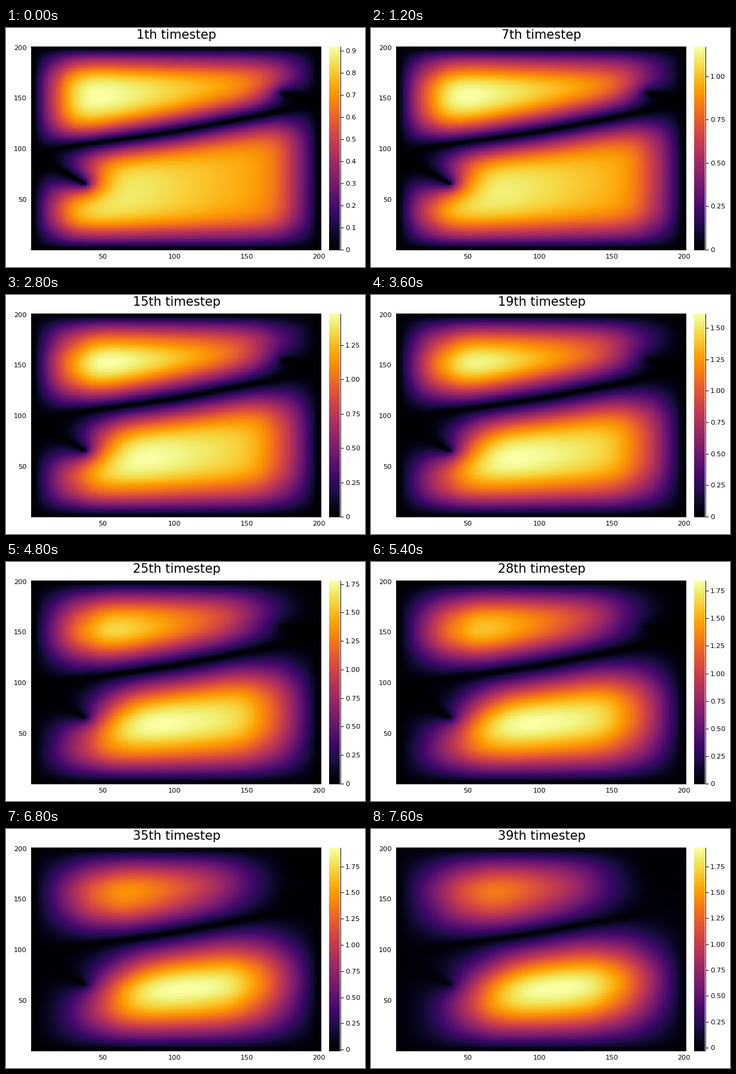
A matplotlib script that plays this animation: 600 px wide and 400 px high, repeating every 7.8 s.

```python
import numpy as np
import matplotlib.pyplot as plt
from matplotlib.animation import FuncAnimation

W, H, N, STEPS = 600, 400, 201, 39
L, R, TOP, BOT = 42, 527, 31, 372
BAR_L, BAR_R = 540, 558
WALL = [(38, 66), (1, 95), (22, 102), (66, 110.5), (100, 117.5),
        (130, 125.5), (165, 135), (201, 148), (173.5, 156.5)]
SPEED, SUB, LEAD = 0.92, 4, 18   # cells per step, substeps, steps before start
SOFTEN = 100                     # variance/2 of the initial smoothing

plt.rcParams["font.family"] = "DejaVu Sans"


def free_cells(margin):
    free = np.zeros((N, N))
    free[margin:-margin, margin:-margin] = 1
    for (x0, y0), (x1, y1) in zip(WALL, WALL[1:]):
        k = np.linspace(0, 1, 500)
        col = np.rint(x0 + (x1 - x0) * k).astype(int) - 1
        row = np.rint(y0 + (y1 - y0) * k).astype(int) - 1
        free[row, col] = 0
    return free


def laplace(u):
    out = np.zeros_like(u)
    out[1:-1, 1:-1] = (u[:-2, 1:-1] + u[2:, 1:-1] + u[1:-1, :-2]
                       + u[1:-1, 2:] - 4 * u[1:-1, 1:-1])
    return out


def start_velocity():
    x, y = np.meshgrid(np.arange(1, N + 1), np.arange(1, N + 1))
    free = free_cells(5)
    v = (1 - 0.0018 * x + 0.0003 * y) * free
    for _ in range(SOFTEN * 5):
        v = (v + 0.2 * laplace(v)) * free
    return v


KNOTS = [1, 7, 11, 19, 25, 32, 39]
PEAK = np.polyfit(KNOTS, [0.919, 1.176, 1.328, 1.609, 1.787, 1.90, 1.935], 4)


def simulate():
    """Wave equation with fixed edges, starting flat with a push."""
    free = free_cells(2)
    before = np.zeros((N, N))
    now = start_velocity() / SUB
    courant = (SPEED / SUB) ** 2
    fields = []
    for n in range(1, (LEAD + STEPS) * SUB + 1):
        before, now = now, (2 * now - before + courant * laplace(now)) * free
        step, rest = divmod(n, SUB)
        if step > LEAD and rest == 0:
            fields.append(now * np.polyval(PEAK, step - LEAD) / now.max())
    return fields


FIELDS = simulate()

fig = plt.figure(figsize=(W / 100, H / 100), dpi=100, facecolor="white")


def panel(left, right):
    ax = fig.add_axes([left / W, 1 - BOT / H, (right - left) / W, (BOT - TOP) / H])
    ax.set_axis_off()
    return ax


page = fig.add_axes([0, 0, 1, 1])
page.set(xlim=(0, W), ylim=(H, 0))
page.set_axis_off()
image = panel(L, R).imshow(FIELDS[0], cmap="inferno", origin="lower",
                           aspect="auto", interpolation="nearest")
panel(BAR_L, BAR_R).imshow(np.arange(256)[:, None], cmap="inferno",
                           origin="lower", aspect="auto")


def label(x, y, text, ha, size=8.2):
    return page.text(x, y, text, ha=ha, va="center_baseline", fontsize=size)


def line(xs, ys):
    return page.plot(xs, ys, color="black", lw=0.72, solid_capstyle="butt")[0]


for value in (50, 100, 150, 200):
    label(L + (value - 0.5) / N * (R - L), 382.5, str(value), "center")
    label(35, BOT - 1 - (value - 0.5) / N * (BOT - TOP), str(value), "right")
line([558.5, 558.5], [TOP, BOT])
title = label(285, 10.5, "", "center", 15)
ticks = [(line([], []), label(567, 0, "", "left")) for _ in range(11)]


def draw(i):
    u = FIELDS[i]
    lo, hi = u.min(), u.max()
    image.set_data(u)
    image.set_clim(lo, hi)
    title.set_text(f"{i + 1}th timestep")
    gap, fmt = (0.1, "{:.1f}") if hi < 1 else (0.25, "{:.2f}")
    for k, (mark, text) in enumerate(ticks):
        value = k * gap
        shown = value <= hi
        mark.set_visible(shown)
        text.set_visible(shown)
        y = BOT - 1 - (value - lo) / (hi - lo) * (BOT - 1 - TOP)
        mark.set_data([559, 564], [y, y])
        text.set_y(y)
        text.set_text(fmt.format(value) if k else "0")
    return []


anim = FuncAnimation(fig, draw, frames=STEPS, interval=200, repeat=True,
                     repeat_delay=0, blit=False)
plt.show()
```
